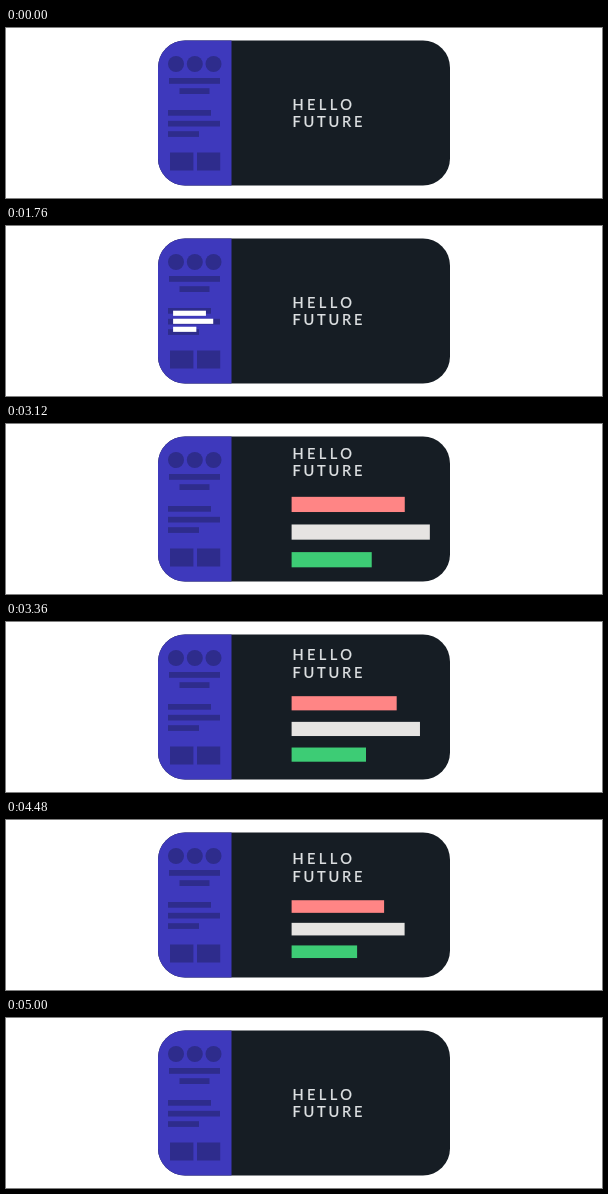
An HTML page that plays this animation: 596x170 px, repeating every 5.16 s.

```html
<!DOCTYPE html>
<html lang="en">
<head>
<meta charset="utf-8">
<title>Hello future</title>
<style>
  html, body { margin: 0; width: 100%; height: 100%; overflow: hidden; background: #fff; }
  svg { display: block; width: 596px; height: 170px; }
  text { font: 500 14.6px Lato, "Open Sans", sans-serif; fill: #dde0e2; stroke: #dde0e2; stroke-width: .2px; }
</style>
</head>
<body>
<svg viewBox="0 0 596 170">
  <clipPath id="card"><rect x="152" y="12.5" width="292" height="145" rx="27"/></clipPath>
  <g clip-path="url(#card)">
    <rect x="152" y="12" width="292" height="146" fill="#161d24"/>
    <rect x="152" y="12" width="73.5" height="146" fill="#3e39bc"/>
    <g fill="#2e2c8c">
      <circle cx="170" cy="36" r="8"/>
      <circle cx="188.8" cy="36" r="8"/>
      <circle cx="207.5" cy="36" r="8"/>
      <rect x="163" y="50" width="51" height="5.8"/>
      <rect x="173.5" y="60.2" width="30" height="5.8"/>
      <rect x="162" y="82" width="43" height="5.7"/>
      <rect x="162" y="92.8" width="52" height="5.7"/>
      <rect x="162" y="103.2" width="31" height="5.7"/>
      <rect x="164" y="124.5" width="23.4" height="18"/>
      <rect x="191" y="124.5" width="23.2" height="18"/>
    </g>
    <g id="title">
      <text x="286.4" y="81.8" letter-spacing="3.4">HELLO</text>
      <text x="286.4" y="99.4" letter-spacing="2.8">FUTURE</text>
    </g>
    <g id="bars"><rect/><rect/><rect/></g>
  </g>
</svg>
<script>
const LOOP = 5160, STEP = 40;
const WIDTHS = [92.5, 113, 65.5];
const COLORS = [[255, 133, 133], [230, 228, 226], [61, 204, 117]];

const linear = p => p;
const out = p => 1 - (1 - p) ** 3;
const inOut = p => p < .5 ? 4 * p ** 3 : 1 - 4 * (1 - p) ** 3;
const soft = p => (1 - Math.cos(Math.PI * p)) / 2;

// Each key is [time, value, easing towards this key].
const tracks = {
  title: [[1790, 0], [2210, -40, inOut], [2960, -40], [3160, -48, soft], [3540, -40, soft],
          [4300, -40], [5010, 0, inOut]],
  scale: [[1000, .43], [1560, .355, out], [2960, .355], [3160, 1.315, soft], [3520, 1.01, soft],
          [4080, 1, out]],
  x: [[1000, 163], [1560, 167.1, out], [1820, 167.1], [2400, 288.8, inOut], [2960, 288.8],
      [3120, 285.6, soft]],
  y: [[1000, 82.6], [1560, 84.7, out], [1820, 84.7], [2400, 75, inOut], [2960, 75],
      [3160, 72.6, soft], [3520, 75.3, soft], [4300, 75.3], [4900, 121, inOut]],
  alpha: [[1000, 0], [1200, 1, linear], [4480, 1], [4680, 0, linear]],
  tint: [[2960, 0], [3100, 1, linear]]
};

function at(name, t) {
  const keys = tracks[name];
  const i = keys.findIndex(k => k[0] > t);
  if (i === 0) return keys[0][1];
  if (i < 0) return keys[keys.length - 1][1];
  const [t0, a] = keys[i - 1], [t1, b, ease = linear] = keys[i];
  return a + (b - a) * ease((t - t0) / (t1 - t0));
}

const title = document.getElementById("title");
const group = document.getElementById("bars");
const bars = [...group.children];

function draw(t) {
  title.setAttribute("transform", `translate(0 ${at("title", t)})`);
  group.setAttribute("opacity", at("alpha", t));
  const s = at("scale", t), x = at("x", t), y = at("y", t), tint = at("tint", t);
  bars.forEach((bar, i) => {
    const rgb = COLORS[i].map(c => Math.round(255 + (c - 255) * tint));
    bar.setAttribute("x", x);
    bar.setAttribute("y", y + 22.6 * s * i);
    bar.setAttribute("width", WIDTHS[i] * s);
    bar.setAttribute("height", 1 + 11.6 * s);
    bar.setAttribute("fill", `rgb(${rgb})`);
  });
}

const start = performance.now();
function tick() {
  const t = (performance.now() - start) % LOOP;
  draw(Math.floor(t / STEP) * STEP);
  requestAnimationFrame(tick);
}
tick();
</script>
</body>
</html>
```
